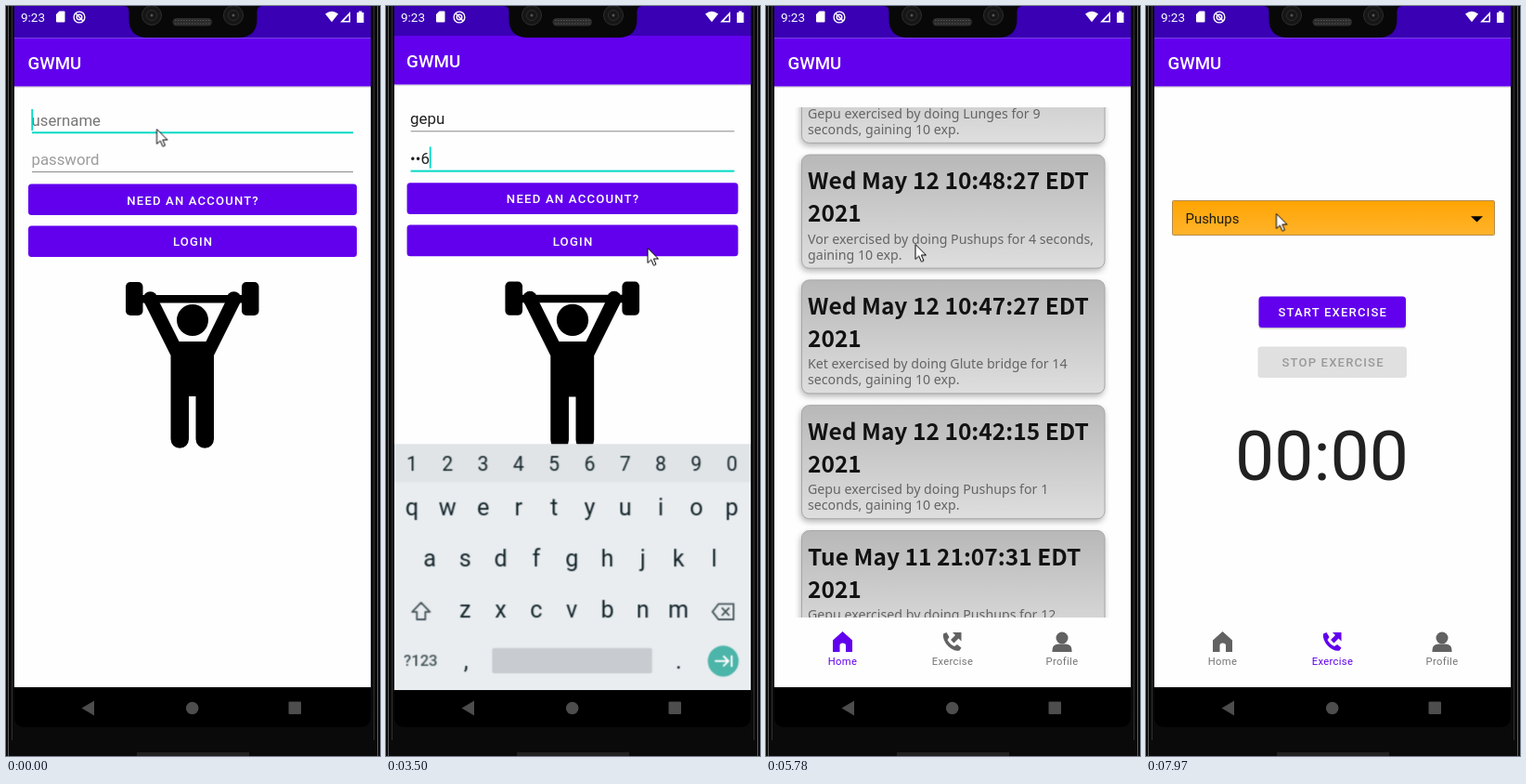
Animation, 403 px wide and 807 px high, one loop 8000 ms. Source, as an HTML page:

```html
<!DOCTYPE html>
<html lang="en">
<head>
<meta charset="utf-8">
<title>Workout app</title>
<style>
html, body { margin: 0; width: 100%; height: 100%; overflow: hidden; background: #0a0a0a; }
svg { display: block; width: 403px; height: 807px; font-family: Roboto, "Noto Sans", sans-serif; }
text { white-space: pre; }
.mid { text-anchor: middle; }
.zoom { transform-origin: 201px 350px; }
.heading { font-size: 18.7px; font-weight: 500; fill: #fff; }
.field { font-size: 16.8px; fill: #212121; }
.btn { font-size: 13.08px; font-weight: 500; letter-spacing: .0893em; text-anchor: middle; fill: #fff; }
.key { font-size: 25px; text-anchor: middle; fill: #13252b; }
.num { font-size: 21px; text-anchor: middle; fill: #13252b; }
.title { font: 700 24.5px "Noto Sans CJK JP", "Noto Sans CJK SC", "Noto Sans CJK", "Noto Sans", sans-serif; fill: #121212; }
.body { font: 14.2px "Noto Sans", "Open Sans", sans-serif; fill: #646464; }
.tab { font-size: 11.2px; letter-spacing: .033em; text-anchor: middle; }
.card { fill: url(#steel); stroke: #a6a6a6; filter: drop-shadow(-1px 3px 3px rgba(0, 0, 0, .28)); }
.ripple { fill: #6200ee; fill-opacity: .1; }
</style>
</head>
<body>
<svg viewBox="0 0 403 807">
  <defs>
    <linearGradient id="steel" x2="0" y2="1"><stop stop-color="#b8b8b8"/><stop offset="1" stop-color="#dedede"/></linearGradient>
    <linearGradient id="amber" x2="0" y2="1"><stop stop-color="#ffa504"/><stop offset="1" stop-color="#ffb32b"/></linearGradient>
    <clipPath id="screen"><path d="M9 0H393V764Q393 776 381 776H21Q9 776 9 764Z"/></clipPath>
    <clipPath id="window"><path d="M9 0H393V733H9Z"/></clipPath>
    <clipPath id="feed"><path d="M31 109H370V658H31Z"/></clipPath>
    <g id="page">
      <path fill="#fefefe" d="M9 34H393V733H9Z"/>
      <path fill="#3900b4" d="M9 0H393V34.5H9Z"/>
      <path fill="#6200ee" d="M9 34.5H393V86.5H9Z"/>
      <path fill="#000" opacity=".12" d="M9 86.5H393V88H9Z"/>
      <text class="heading" x="23.5" y="68">GWMU</text>
    </g>
  </defs>

  <path fill="#0a0a0a" d="M0 0H403V807H0Z"/>
  <path stroke="#5c5c5c" d="M2.5 0V807M400.5 0V807"/>
  <path stroke="#303030" d="M6.5 0V790M396.5 0V790"/>
  <path fill="#222" d="M141 803H262V807H141Z"/>

  <g clip-path="url(#screen)">
    <path d="M9 0H393V776H9Z"/>

    <g data-on="0 3770"><g id="login" class="zoom">
      <use href="#page"/>
      <g class="field">
        <text x="27.5" y="129" style="fill:#757575" data-on="0 790">username</text>
        <text x="27.5" y="129" data-on="790 940">ge</text>
        <text x="27.5" y="129" data-on="940 3770">gepu</text>
        <text x="27.5" y="171" style="fill:#9c9c9c" data-on="0 2170">password</text>
        <text x="27.5" y="171" data-on="2170 2290">2</text>
        <text x="27.5" y="171" data-on="2290 2690">•4</text>
        <text x="27.5" y="171" data-on="2690 3770">••6</text>
      </g>
      <g fill="#03dac5">
        <path d="M28 135.3H374V137.2H28Z" data-on="0 1090"/>
        <path d="M28 178H374V179.9H28Z" data-on="1090 3770"/>
        <path d="M27.3 111H29.1V134H27.3Z" data-on="0 790"/>
        <path d="M46 111H47.8V134H46Z" data-on="790 940"/>
        <path d="M65 111H66.8V134H65Z" data-on="940 1090"/>
        <path d="M27.3 153H29.1V176H27.3Z" data-on="1090 1620,1900 2170"/>
        <path d="M37 153H38.8V176H37Z" data-on="2170 2290"/>
        <path d="M42.6 153H44.4V176H42.6Z" data-on="2290 2690"/>
        <path d="M48 153H49.8V176H48Z" data-on="2690 3770"/>
      </g>
      <g stroke="#8b8b8b">
        <path d="M28 178.5H374" data-on="0 1090"/>
        <path d="M28 136.5H374" data-on="1090 3770"/>
      </g>
      <g fill="#6200ee">
        <rect x="24" y="191.5" width="354" height="33.5" rx="3.5"/>
        <rect x="24" y="236.5" width="354" height="33.5" rx="3.5"/>
      </g>
      <text class="btn" x="201.6" y="213.5">NEED AN ACCOUNT?</text>
      <text class="btn" x="201.6" y="258.3">LOGIN</text>

      <rect x="129" y="297" width="18.5" height="36" rx="5"/>
      <rect x="254" y="297" width="18.5" height="36" rx="5"/>
      <path d="M146 311H256V319.5H146Z"/>
      <circle cx="155.5" cy="315" r="7.8"/><circle cx="245.5" cy="315" r="7.8"/>
      <circle cx="201" cy="338" r="17"/>
      <path d="M148.5 318L163 314L186.5 361H215.5L238.5 314L253 318L224 376V466A9.7 9.7 0 0 1 204.5 466V420H197V466A9.7 9.7 0 0 1 177.5 466V376Z"/>

      <g clip-path="url(#window)"><g id="keypad">
        <path fill="#e9edf0" d="M9 470H393V733H9Z"/>
        <path fill="#e0e4e7" d="M9 470H393V511H9Z"/>
        <g id="digits" data-on="1090 3770"></g>
        <g id="letters"></g>
        <text x="20.5" y="707.5" font-size="16.5" font-weight="500" fill="#46555b">?123</text>
        <text class="key" x="87" y="710">,</text>
        <text class="key" x="314.5" y="710">.</text>
        <rect x="115" y="688" width="171" height="27" rx="2.5" fill="#c8ccd0"/>
        <g fill="none" stroke="#46555b" stroke-width="1.8">
          <path d="M39 639.5L48.5 649.5H43.5V657.5H34.5V649.5H29.5Z" stroke-linejoin="round"/>
          <path d="M357 641H373V657.5H357L350.5 649.2ZM360.5 645L368.5 653.3M368.5 645L360.5 653.3"/>
        </g>
        <circle cx="362" cy="702" r="16.5" fill="#4cb5a9"/>
        <path d="M353 702H367M362 696.5L367.5 702L362 707.5M371 696V708" fill="none" stroke="#fff" stroke-width="2"/>
      </g></g>
    </g></g>

    <g data-on="3620 8000"><g id="main" class="zoom">
      <use href="#page"/>
      <g data-on="3620 7390">
        <g clip-path="url(#feed)">
          <g id="cards"></g>
          <path d="M31 109H370V119Q200 154 31 119Z" fill="#6200ee" fill-opacity=".08" data-on="6450 6720"/>
        </g>
      </g>
      <g data-on="7390 8000">
        <rect x="28.5" y="209.5" width="347" height="37" rx="1" fill="url(#amber)" stroke="#b38a4e"/>
        <text x="42.5" y="234" font-size="14.95" fill="#1d1a14">Pushups</text>
        <path d="M350 226.3H363L356.5 232.5Z"/>
        <rect x="121.5" y="314" width="158.5" height="33.5" rx="3.5" opacity=".2"/>
        <rect x="121.5" y="312.5" width="158.5" height="33.5" rx="3.5" fill="#6200ee"/>
        <rect x="120.5" y="366.5" width="160.5" height="33.5" rx="3.5" fill="#e0e0e0"/>
        <text class="btn" x="201.3" y="334.3">START EXERCISE</text>
        <text class="btn" x="201.6" y="388.3" style="fill:#999">STOP EXERCISE</text>
        <text class="mid" x="189.5" y="510" font-size="75" fill="#212121">00:00</text>
      </g>
      <g id="tabs"></g>
      <ellipse class="ripple" cx="82.5" cy="692" rx="58" ry="26" data-on="6720 6980"/>
      <ellipse class="ripple" cx="201" cy="692" rx="58" ry="26" data-on="7250 7520"/>
    </g></g>

    <g id="toast">
      <rect x="152" y="665" width="97" height="46" rx="23" fill="#efefef" fill-opacity=".94"/>
      <text class="mid" x="200.5" y="693" font-size="13.1" fill="#222">Success!</text>
    </g>

    <g fill="#4d4d4d">
      <path d="M95 747.5V763.5L81.5 755.5Z"/>
      <circle cx="200.7" cy="755.5" r="6.8"/>
      <rect x="304.5" y="748.5" width="13.5" height="13.5" rx="1"/>
    </g>
    <g fill="#fff">
      <text x="16" y="17" font-size="13.5">9:23</text>
      <path d="M57.5 5.5H62.5Q63.5 5.5 63.5 6.5V16.5Q63.5 17.5 62.5 17.5H55Q54 17.5 54 16.5V9Z"/>
      <path d="M344 8.5Q351 3 358 8.5L351 17.3Z"/>
      <path d="M360 17.5L371 6V17.5ZM364 16H369.5V10Z" fill-rule="evenodd"/>
      <path d="M380 5.5H383.5V7H385.5V18H378V7H380Z"/>
      <path d="M75 8L83 16" stroke="#fff" stroke-width="1.5"/>
    </g>
    <g fill="none" stroke="#fff" stroke-width="1.4">
      <circle cx="79" cy="12" r="5.9"/><circle cx="79" cy="12" r="2.8"/>
    </g>
  </g>

  <path d="M127 0Q132.5 0 132.5 6V14Q132.5 34 153 34H250Q270.5 34 270.5 14V6Q270.5 0 276 0Z" fill="#080808"/>
  <g fill="#161616" stroke="#2e2e2e">
    <circle cx="157" cy="10" r="10.5"/><circle cx="245" cy="10" r="10.5"/>
    <circle cx="157" cy="10" r="5.5"/><circle cx="245" cy="10" r="5.5"/>
  </g>
  <g fill="#555"><circle cx="157" cy="10" r="1.5"/><circle cx="245" cy="10" r="1.5"/></g>
  <rect x="179.5" y="13" width="42.5" height="8.5" rx="4.2" fill="#2b2b2b"/>
  <path d="M182 15.5H220M182 19H220" stroke="#555" stroke-dasharray="1.5 1.5"/>

  <path id="mouse" d="M0 0V16L3.8 12.6L6.4 18.6L9 17.5L6.4 11.6H11.5Z" fill="#fff" stroke="#000"/>
</svg>

<script>
const LOOP = 8000;
const $ = id => document.getElementById(id);

const row = (chars, x, y, cls) => [...chars].map((c, i) =>
  `<text class="${cls}" x="${x + i * 38}" y="${y}">${c}</text>`).join('');
$('digits').innerHTML = row('1234567890', 29.3, 499, 'num');
$('letters').innerHTML = row('qwertyuiop', 29.3, 546, 'key')
  + row('asdfghjkl', 48.2, 601, 'key') + row('zxcvbnm', 86.2, 656, 'key');

// date, who, exercise, seconds, exp, whether "seconds," fits on the first line
const feed = [
  ['Tue May 18 09:20:02', 'Gepu', 'Pushups', 4, 0],
  ['Wed May 12 11:32:15', 'Vor', 'Pushups', 2, 5, true],
  ['Wed May 12 11:11:24', 'Gepu', 'Pushups', 1, 10],
  ['Wed May 12 11:02:45', 'Vor', 'Pushups', 5, 10, true],
  ['Wed May 12 11:01:23', 'Gepu', 'Lunges', 9, 10],
  ['Wed May 12 10:48:27', 'Vor', 'Pushups', 4, 10, true],
  ['Wed May 12 10:47:27', 'Ket', 'Glute bridge', 14, 10],
  ['Wed May 12 10:42:15', 'Gepu', 'Pushups', 1, 10],
  ['Tue May 11 21:07:31', 'Gepu', 'Pushups', 12, 10]
];
$('cards').innerHTML = feed.map(([date, who, what, secs, exp, fits], i) => `
  <g transform="translate(38 ${114 + i * 134.8})">
    <rect class="card" x=".5" y=".5" width="326.5" height="122" rx="8"/>
    <text class="title" x="7" y="37.5">${date} EDT</text>
    <text class="title" x="7" y="72.8">2021</text>
    <text class="body" x="7" y="96">${who} exercised by doing ${what} for ${secs}${fits ? ' seconds,' : ''}</text>
    <text class="body" x="7" y="113">${fits ? '' : 'seconds, '}gaining ${exp} exp.</text>
  </g>`).join('');

const tabs = [
  ['Home', 82.5, '<path d="M82.5 673L93 682.5V695H86V688Q86 685.5 82.5 685.5Q79.5 685.5 79.5 688V695H72V682.5Z"/>'],
  ['Exercise', 201, `<path d="M191 675.5L194.5 674L197.5 679L195.5 682Q198 687 203 689L206 687L210.5 690.5L208.5 693.5
    Q203 695 196.5 689Q190 682.5 191 675.5Z"/><path d="M201 674H210.5V683.5L207.5 680.5L202.5 685.5L199 682L204 677Z"/>`],
  ['Profile', 319, '<circle cx="319" cy="680" r="6.5"/><path d="M308.5 695V693Q308.5 686.5 315.5 686.5H322.5Q329.5 686.5 329.5 693V695Z"/>']
];
const nav = (active, span) => `<g data-on="${span}">` + tabs.map(([name, x, icon]) => {
  const on = name === active;
  return `<g fill="${on ? '#6200ee' : '#626262'}">${icon}</g>
    <text class="tab" x="${x}" y="709" fill="${on ? '#6200ee' : '#757575'}">${name}</text>`;
}).join('') + '</g>';
$('tabs').innerHTML = nav('Home', '3620 7390') + nav('Exercise', '7390 8000');

let css = '', count = 0;
// keys: [ms, declaration, steps until the next key]
function track(el, keys) {
  const name = 'k' + count++;
  css += `@keyframes ${name}{` + keys.map(([ms, rule, n = 1]) =>
    `${ms / LOOP * 100}%{${rule};animation-timing-function:steps(${n})}`).join('') + '}\n';
  el.style.animation = `${name} ${LOOP}ms infinite`;
}
const move = (ms, x, y, n) => [ms, `transform:translate(${x}px,${y}px)`, n];
const scale = (ms, k) => [ms, `transform:scale(${k})`];
const fade = (ms, o) => [ms, `opacity:${o}`];

document.querySelectorAll('[data-on]').forEach(el => {
  const keys = [fade(0, 0)];
  el.dataset.on.split(',').forEach(span => {
    const [from, to] = span.split(' ').map(Number);
    keys.push(fade(from, 1), fade(to, 0));
  });
  track(el, keys);
});

track($('keypad'), [move(0, 0, 263), move(150, 0, 205), move(270, 0, 95), move(390, 0, 26),
  move(510, 0, 0), move(LOOP, 0, 0)]);
track($('login'), [scale(0, 1), scale(3500, 1.008), scale(3620, 1.1), scale(LOOP, 1.1)]);
track($('main'), [scale(0, .95), scale(3620, .95), scale(3770, .99), scale(3900, 1), scale(LOOP, 1)]);
track($('toast'), [fade(0, 0), fade(3900, 1), fade(5270, .6), fade(5400, .25), fade(5540, 0), fade(LOOP, 0)]);
track($('cards'), [move(0, 0, 0), move(4300, 0, 0, 3), move(4730, 0, -230, 2), move(4990, 0, -260),
  move(5120, 0, -381.6, 3), move(5520, 0, -563.6, 2), move(5780, 0, -628.4), move(5930, 0, -560, 4),
  move(6450, 0, 0), move(LOOP, 0, 0)]);
track($('mouse'), [move(0, 162.5, 132.5), move(1900, 164, 130, 3), move(2290, 173, 125), move(2690, 180, 132, 5),
  move(3360, 282, 260.5), move(3770, 282, 260.5, 4), move(4300, 170, 560, 3), move(4730, 155, 330, 2),
  move(4990, 150, 560), move(5120, 149.5, 438, 3), move(5520, 161, 256.5), move(5930, 160, 320, 3),
  move(6320, 130, 590, 2), move(6590, 97, 695.5), move(6980, 186, 690), move(7250, 186, 690, 5),
  move(7970, 140.5, 223.5), move(LOOP, 140.5, 223.5)]);

const sheet = document.createElement('style');
sheet.textContent = css;
document.head.append(sheet);
</script>
</body>
</html>
```
